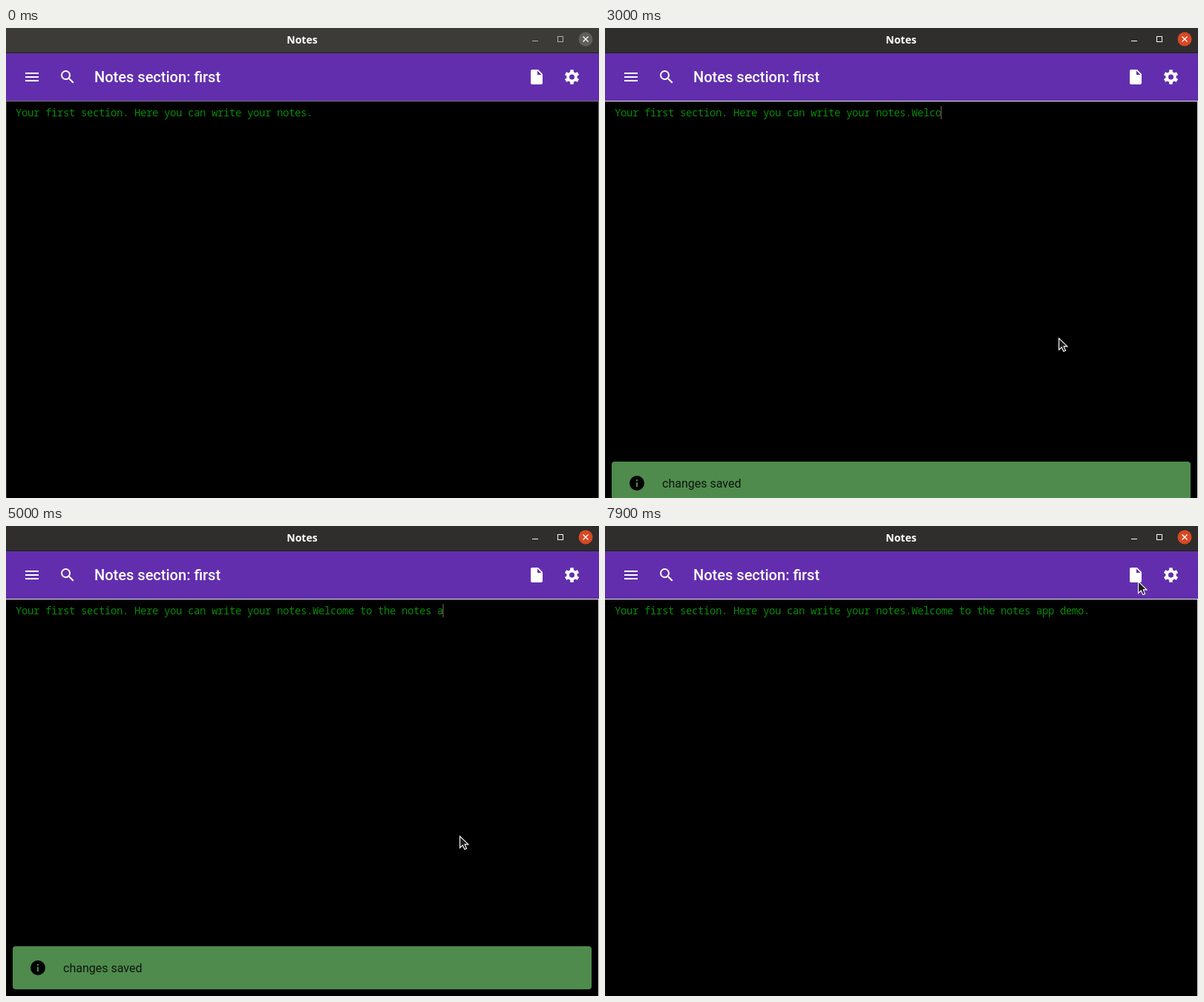
An HTML page that plays this animation: 799 px wide and 633 px high, repeating every 8 s.

```html
<!DOCTYPE html>
<html lang="en">
<head>
<meta charset="utf-8">
<title>Notes</title>
<style>
html, body { margin: 0; width: 100%; height: 100%; overflow: hidden; background: #000; }
svg, .text, #toast, #caret { position: absolute; left: 0; top: 0; }
.text { white-space: pre; }
#title { width: 798px; top: 6px; font: 700 14px/19px "Noto Sans", "Open Sans", sans-serif; text-align: center; color: #fff; }
#heading { left: 119px; top: 54px; font: 500 20px/24px Roboto, sans-serif; color: #fff; }
#note { left: 13px; top: 104px; font: 400 14px/19px "Roboto Mono", "Noto Sans Mono", monospace; color: #098a0b; }
#caret { top: 105px; width: 2px; height: 18px; background: #43352f; }
#toast { left: 9px; width: 780px; height: 58px; border-radius: 4px; background: #4f8b4d; }
#saved { left: 68px; top: 20px; font: 400 16px/19px Roboto, sans-serif; color: #0e150e; }
</style>
</head>
<body>
<svg width="799" height="633">
  <rect id="bar" width="799" height="34"/>
  <rect y="33" width="799" height="1" fill="#1f1e1c"/>
  <g id="controls">
    <rect x="709" y="17" width="8" height="1" fill="#fff"/>
    <rect x="743.5" y="11.5" width="7" height="7" fill="none" stroke="#fff"/>
  </g>
  <circle id="close" cx="781" cy="15" r="9.5"/>
  <path d="M777.5 11.5l7 7m0-7l-7 7" stroke="#fff" stroke-width="1.4"/>

  <rect y="34" width="799" height="64" fill="#622eae"/>
  <g fill="#fff">
    <path transform="translate(23 54)" d="M3 18h18v-2H3v2zm0-5h18v-2H3v2zm0-7v2h18V6H3z"/>
    <path transform="translate(71 54)" d="M15.5 14h-.79l-.28-.27A6.47 6.47 0 0 0 16 9.5 6.5 6.5 0 1 0 9.5 16c1.61 0 3.09-.59 4.23-1.57l.27.28v.79l5 4.99L20.49 19l-4.99-5zm-6 0a4.5 4.5 0 1 1 0-9 4.5 4.5 0 0 1 0 9z"/>
    <path transform="translate(703 54)" d="M6 2c-1.1 0-1.99.9-1.99 2L4 20c0 1.1.89 2 1.99 2H18c1.1 0 2-.9 2-2V8l-6-6H6zm7 7V3.5L18.5 9H13z"/>
    <path id="gear" fill-rule="evenodd" transform="translate(762.5 66)"/>
  </g>

  <rect id="edgeTop" y="98" width="799" height="1"/>
  <rect id="edgeLeft" y="99" width="1" height="534"/>
  <rect id="edgeRight" x="798" y="98" width="1" height="535"/>
</svg>

<div class="text" id="title">Notes</div>
<div class="text" id="heading">Notes section: first</div>
<div class="text" id="note"></div>
<div id="caret"></div>

<div id="toast">
  <svg width="60" height="58">
    <circle cx="34" cy="29" r="10"/>
    <path d="M33 24h2v2h-2zM33 28h2v6h-2z" fill="#4f8b4d"/>
  </svg>
  <div class="text" id="saved">changes saved</div>
</div>

<svg id="pointer" width="14" height="20">
  <path d="M.6 .8V16.4L4.3 13l2.6 5.6 2.8-1.2L7.200 11.900H12z" fill="#1c1c1c" stroke="#fff" stroke-width="1.1"/>
</svg>

<script>
const LOOP = 8000, STEP = 100, CHAR = 8, LEFT = 13, BLINK = 480;
const BASE = "Your first section. Here you can write your notes.";
const TYPED = "Welcome to the notes app demo.";
// Key points [time, characters typed], joined by steady typing
const PACE = [[2200, 0], [2300, 1], [2900, 4], [3300, 8], [4400, 18], [5900, 28], [6300, 28], [6400, 30]];

const el = id => document.getElementById(id);
const mix = (a, b, k) => a + (b - a) * k;
const ramp = (t, from, to) => Math.min(1, Math.max(0, (t - from) / (to - from)));
const easeIn = k => k * k;
const easeOut = k => 1 - (1 - k) ** 2;
const smooth = k => k * k * (3 - 2 * k);
const grey = v => [v, v, v];

function typedCount(t) {
  let count = 0;
  for (let i = 1; i < PACE.length; i++) {
    const [t0, n0] = PACE[i - 1], [t1, n1] = PACE[i];
    count += (n1 - n0) * ramp(t, t0, t1);
  }
  return Math.floor(count + 1e-6);
}

function caretOn(t) {
  if (t < 1000) return false;
  if (t >= 2300 && t < 6450) return true;
  const since = t - (t < 2300 ? 1000 : 6450);
  return since % (2 * BLINK) < BLINK;
}

function pointerAt(t) {
  const enter = easeOut(ramp(t, 500, 1600)), leave = smooth(ramp(t, 7100, 7900));
  return [mix(mix(560, 611, enter), 718, leave), mix(mix(20, 417, enter), 74, leave)];
}

function gearPath() {
  const points = [];
  for (let i = 0; i < 6; i++) {
    for (const [r, turn] of [[7.2, -19], [10, -13], [10, 13], [7.2, 19]]) {
      const a = (i * 60 + turn - 90) * Math.PI / 180;
      points.push(`${(r * Math.cos(a)).toFixed(2)} ${(r * Math.sin(a)).toFixed(2)}`);
    }
  }
  return `M${points.join("L")}ZM-3.5 0a3.5 3.5 0 1 0 7 0a3.5 3.5 0 1 0-7 0z`;
}

function render(t) {
  const focus = ramp(t, 900, 1200);
  const paint = (id, from, to) =>
    el(id).setAttribute("fill", `rgb(${from.map((v, i) => Math.round(mix(v, to[i], focus)))})`);
  paint("bar", [60, 59, 56], [47, 46, 44]);
  paint("close", [96, 95, 92], [216, 72, 36]);
  paint("edgeTop", grey(118), grey(235));
  paint("edgeLeft", grey(55), grey(12));
  paint("edgeRight", grey(110), grey(225));
  el("controls").setAttribute("opacity", mix(.6, 1, focus));

  const count = typedCount(t);
  el("note").textContent = BASE + TYPED.slice(0, count);
  el("caret").style.left = LEFT + CHAR * (BASE.length + count) - 1 + "px";
  el("caret").style.opacity = caretOn(t) ? 1 : 0;

  const shown = easeOut(ramp(t, 2800, 3200)) - easeIn(ramp(t, 6600, 7000));
  el("toast").style.transform = `translateY(${Math.round(mix(639, 566, shown))}px)`;

  const [x, y] = pointerAt(t).map(Math.round);
  el("pointer").style.transform = `translate(${x}px, ${y}px)`;
  el("pointer").style.visibility = t < 600 ? "hidden" : "visible";
}

// Keep the editor on a whole-pixel character grid
function snapGrid() {
  const note = el("note");
  note.textContent = BASE;
  const pitch = note.getBoundingClientRect().width / BASE.length;
  note.style.letterSpacing = CHAR - pitch + "px";
}

el("gear").setAttribute("d", gearPath());
snapGrid();
const start = performance.now();
function tick() {
  const t = (performance.now() - start) % LOOP;
  render(Math.floor(t / STEP) * STEP);
  requestAnimationFrame(tick);
}
tick();
</script>
</body>
</html>
```
